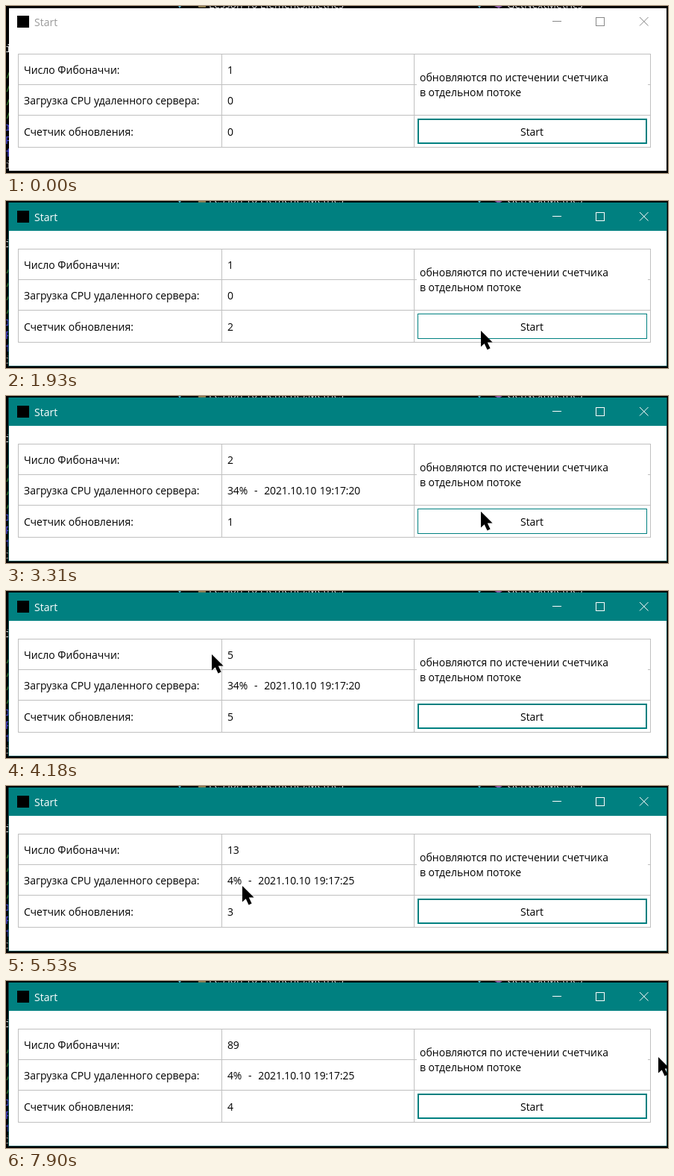
An HTML page that plays this animation: 888x224 px, repeating every 7.99 s.

```html
<!DOCTYPE html>
<html lang="ru">
<head>
<meta charset="utf-8">
<title>Start</title>
<style>
  html, body { margin: 0; width: 100%; height: 100%; overflow: hidden; background: #000; }
  svg { display: block; width: 888px; height: 224px; }
  text { font: 14px "Open Sans", "Noto Sans", sans-serif; white-space: pre; }
  .code text { font: 14px "Noto Sans Mono", monospace; }
  .value { letter-spacing: -.13px; word-spacing: .9px; }
  .lines { fill: none; stroke: #c0c0c0; shape-rendering: crispEdges; }
  .crisp { shape-rendering: crispEdges; }
</style>
</head>
<body>
<svg viewBox="0 0 888 224">
  <defs>
    <g id="caption">
      <text x="38" y="27" stroke="none">Start</text>
      <path class="crisp" fill="none" d="M733 20.5h12M791.5 15.5h11v11h-11z"/>
      <path fill="none" d="M850 15l11.5 11.5M861.5 15L850 26.5"/>
    </g>
  </defs>

  <rect width="888" height="224" fill="#000"/>
  <g fill="#d8d8d8">
    <path d="M231 0h4l-2 3z" fill="#5ab0c8"/>
    <path d="M258 0h10v2h-10z" fill="#8a7a50"/>
    <text x="272" y="3">Lesson 10 Elements.Metrics</text>
    <path d="M633 0h4l-2 3z" fill="#5ab0c8"/>
    <path d="M655 0h11l-5 3z" fill="#8c5aa8"/>
    <text x="672" y="3">GetNextMetrics</text>
  </g>
  <g class="code" id="code"></g>

  <rect x="4" y="3" width="882" height="218" fill="#fff"/>
  <use href="#caption" fill="#999" stroke="#888"/>
  <g id="active">
    <rect class="crisp" x="3.5" y="2.5" width="883" height="219" fill="none" stroke="#064a4a"/>
    <rect x="4" y="2" width="882" height="38" fill="#008080"/>
    <use href="#caption" fill="#fff" stroke="#fff"/>
  </g>
  <rect x="15" y="13" width="16" height="16" fill="#000"/>

  <path class="lines" d="M16.5 64.5h848v125h-848zM289.5 64v126M547.5 64v126M16 105.5h849M16 146.5h849"/>
  <rect x="551" y="80" width="310" height="54" fill="#fff"/>
  <text x="24" y="91">Число Фибоначчи:</text>
  <text x="24" y="132">Загрузка CPU удаленного сервера:</text>
  <text x="24" y="174">Счетчик обновления:</text>
  <text x="555" y="101">обновляются по истечении счетчика</text>
  <text x="555" y="121">в отдельном потоке</text>
  <text class="value" id="fib" x="297" y="91"></text>
  <text class="value" id="cpu" x="297" y="132"></text>
  <text class="value" id="count" x="297" y="174"></text>

  <g class="crisp" fill="none" stroke="#008080">
    <rect x="552.5" y="151.5" width="307" height="33"/>
    <rect id="focus" x="553.5" y="152.5" width="305" height="31"/>
  </g>
  <text x="705.5" y="174" text-anchor="middle">Start</text>
  <path id="cursor" d="M0 0V21.5L4.7 17.3L8.6 25.5L12.6 23.6L8.8 15.6H15.6Z" fill="#000"/>
</svg>
<script>
const LOOP = 7990, ACTIVATE = 1280;
const TICK = 103, TICK_ORIGIN = 992, FIRST_TICK = 6;
const $ = id => document.getElementById(id);
const clamp = v => Math.max(0, Math.min(1, v));

// Pointer stops: time, x, y
const path = [
  [540, 350, 226], [700, 311, 140], [850, 400, 72], [1100, 637, 174],
  [2000, 637, 174], [2320, 637, 155], [3310, 637, 155], [4100, 276, 85],
  [4250, 276, 85], [4800, 322, 98], [5500, 317, 134], [5600, 317, 134],
  [6130, 520, 118], [6570, 725, 95], [6640, 725, 95], [7220, 872, 100],
  [7400, 872, 100], [7700, 875, 102]
];

const slivers = [
  [62, "i", "#ddd"], [97, "/", "#3a8a30"], [115, "/", "#3a8a30"], [133, "/", "#3a8a30"],
  [151, "/", "#3a8a30"], [167, "r", "#4a4ae0"], [185, "P", "#4a4ae0"], [202, "f", "#4a4ae0"],
  [218, "i", "#888"]
];
$("code").innerHTML = slivers.map(([y, ch, fill]) =>
  `<text x="-1" y="${y}" fill="${fill}">${ch}</text>`).join("");

function pointer(t) {
  const next = path.findIndex(p => p[0] > t);
  if (next === 0) return path[0].slice(1);
  if (next < 0) return path[path.length - 1].slice(1);
  const a = path[next - 1], b = path[next];
  const u = (t - a[0]) / (b[0] - a[0]), k = u * u * (3 - 2 * u);
  return [1, 2].map(i => Math.round(a[i] + (b[i] - a[i]) * k));
}

function fibonacci(n) {
  let a = 0, b = 1;
  while (n-- > 0) [a, b] = [b, a + b];
  return a;
}

function cpuLoad(t) {
  if (t < 2846) return "0";
  return t < 4700 ? "34%  -  2021.10.10 19:17:20" : "4%  -  2021.10.10 19:17:25";
}

function setText(id, value) {
  const el = $(id);
  if (el.textContent !== String(value)) el.textContent = value;
}

function draw(t) {
  const tick = Math.floor((t - TICK_ORIGIN) / TICK);
  const running = tick >= FIRST_TICK;
  setText("fib", running ? fibonacci(Math.floor(tick / 6)) : 1);
  setText("count", running ? 5 - tick % 6 : 0);
  setText("cpu", cpuLoad(t));

  $("active").setAttribute("opacity", clamp((Math.floor((t - ACTIVATE) / 30) + 1) / 4));

  const [x, y] = pointer(t);
  const hover = x >= 552 && x < 860 && y >= 151 && y < 185;
  $("focus").setAttribute("visibility", hover ? "hidden" : "visible");
  $("cursor").setAttribute("transform", `translate(${x} ${y})`);
}

const start = performance.now();
function frame() {
  draw((performance.now() - start) % LOOP);
  requestAnimationFrame(frame);
}
frame();
</script>
</body>
</html>
```
